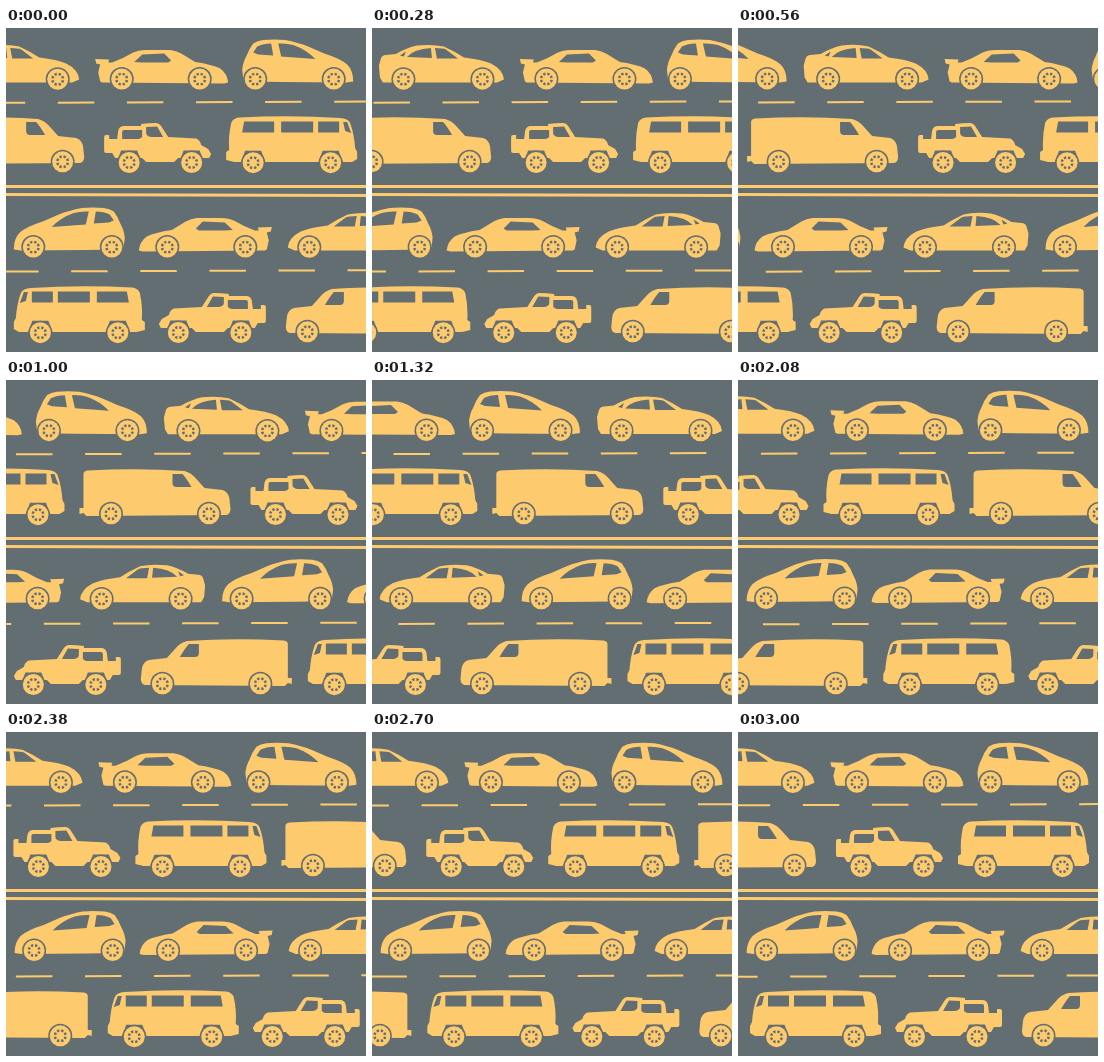
Write an HTML page with a canvas that moves like this. It is 360 px wide and 324 px high and loops after 3.02 s.

```html
<!DOCTYPE html>
<html lang="en">
<head>
<meta charset="utf-8">
<title>Traffic</title>
<style>
  html, body { margin: 0; width: 100%; height: 100%; overflow: hidden; background: #636e72; }
  canvas { display: block; }
</style>
</head>
<body>
<canvas id="stage" width="360" height="324"></canvas>
<script>
const ctx = document.getElementById('stage').getContext('2d');
const ROAD = '#636e72', PAINT = '#fdcb6e', LOOP = 3020;
const BOXY_ARCH = new Path2D('M-14 4L-8-12H8L14 4Z');

// Every vehicle faces right, with its rear bumper at x = 0.
const vehicle = (width, wheels, wheelY, body, windows, boxy) =>
  ({ width, wheels, wheelY, boxy, body: new Path2D(body), windows: new Path2D(windows) });

const hatch = vehicle(111, [13, 91.5], 39.5,
  'M1 39L0 30Q1 22 4 17Q7 9 11 4Q15 1 21 .5Q32-.5 43 .5Q56 3 66 7L82 14Q98 19 105 25Q111 31 111 42L104 43L40 42.5L4 42Z',
  'M36 4Q44 3.5 51 5.5Q64 10 73 19.5L39 17ZM11 13L15 7Q21 4 29 4L31 16L16 15Z');

const sedan = vehicle(125, [24.5, 103.5], 39.7,
  'M1 38L0 26L2 19Q3 15.5 7 15.5L17 14.5Q28 8 38 6Q54 4.5 65 7Q76 12 85 18Q103 20 112 24Q124 30 125 40L118 43H4Z',
  'M28 17.5Q35 9.5 52 8.5L53 18.5ZM56 8.5Q64 8.5 67 10L79 19H58ZM21 16L27 12L25 17Z');

const sports = vehicle(132, [25.5, 103.5], 39.5,
  'M4 42L2 33L4 25L0 24L-1 19.5L13 20L12 23H16Q27 19 36 13.5Q42 10.5 50 10.5H74Q80 11 85 14L99 22.5Q116 25 124 29Q131 34 132 43L128 44L6 43Z',
  'M38 22.5L46 15L68 14L75 21L72 23H46Z');

const van = vehicle(151, [31.5, 129.5], 44.8,
  'M4 44L0 45V39H4L4 5Q4 2 8 1.5Q60-1 105 2Q112 4 116 9L125 19L143 21Q149 23 150 30L151 40Q151 45 147 46L7 47Z',
  'M93 5H103Q106 8 112 18H97Q93 18 93 14Z');

const jeep = vehicle(107, [25, 87.5], 45.5,
  'M0 20Q0 18 2 18H5V22H13L14 14Q15 9 20 9H37V7Q45 6 52 6Q55 6 57 9L64 20L92 21.5Q96 23 97 28L104 32L107 37L105 41L98 41H74L70 45H42L38 41L11 41L8 36H2Q0 36 0 34Z',
  'M18 15Q18 13 20 13H38V20Q36 22 34 22H18ZM42 10L53 9.5L59 20H47Q42 19 42 16Z', true);

const bus = vehicle(132, [27, 104.5], 45.7,
  'M0 43V35L3 33Q2 20 5 6Q7 1 13 .5Q65-2 114 1Q122 1.5 124 6Q128 17 129 31L131 35V42L126 45H8Z',
  'M18 4.5H48V15.5H16ZM55 4.5H87V15.5H55ZM92 4.5H113V15.5H92ZM117 5L121 5L125 16L119 14Z', true);

// cars: [vehicle, left edge at the start]; speed in px/ms until "end"
const lanes = [
  { y: 11.6, rise: 0.8, period: 416, speed: 0.2097, end: 2000,
    cars: [[sedan, -52], [sports, 90], [hatch, 236]] },
  { y: 89, rise: 0, period: 439, speed: 439 / 3000, end: 3000,
    cars: [[van, -73], [jeep, 98], [bus, 220]] },
  { y: 179.6, rise: 0.6, period: 416, speed: -0.2077, end: 2000, left: true,
    cars: [[hatch, 8], [sports, 133], [sedan, 282]] },
  { y: 259, rise: 0, period: 439, speed: -0.145, end: 3000, left: true,
    cars: [[bus, 7], [jeep, 153], [van, 280]] }
];

const mod = (a, n) => ((a % n) + n) % n;

function disc(r, color) {
  ctx.fillStyle = color;
  ctx.beginPath();
  ctx.arc(0, 0, r, 0, 2 * Math.PI);
  ctx.fill();
}

function drawWheel(x, y, boxy) {
  ctx.save();
  ctx.translate(x, y);
  disc(12, ROAD);
  if (boxy) ctx.fill(BOXY_ARCH);
  disc(10.5, PAINT);
  ctx.strokeStyle = ROAD;
  ctx.lineWidth = 2.5;
  for (let i = 0; i < 8; i++) {
    const a = (i + 0.5) * Math.PI / 4;
    ctx.beginPath();
    ctx.arc(0, 0, 5.3, a - 0.22, a + 0.22);
    ctx.stroke();
  }
  ctx.restore();
}

function drawVehicle(v, x, y, left) {
  ctx.save();
  ctx.translate(left ? x + v.width : x, y);
  if (left) ctx.scale(-1, 1);
  ctx.fillStyle = PAINT;
  ctx.fill(v.body);
  ctx.fillStyle = ROAD;
  ctx.fill(v.windows);
  for (const w of v.wheels) drawWheel(w, v.wheelY, v.boxy);
  ctx.restore();
}

function drawLane(lane, t) {
  const time = Math.min(t, lane.end), y = lane.y - lane.rise * time / lane.end;
  for (const [v, start] of lane.cars) {
    const x = mod(start + lane.speed * time + 160, lane.period) - 160;
    drawVehicle(v, x, y, lane.left);
    if (x + lane.period < 361) drawVehicle(v, x + lane.period, y, lane.left);
  }
}

function line(x1, y1, x2, y2, width) {
  ctx.strokeStyle = PAINT;
  ctx.lineWidth = width;
  ctx.beginPath();
  ctx.moveTo(x1, y1);
  ctx.lineTo(x2, y2);
  ctx.stroke();
}

function drawDashes(offset, y) {
  const gap = 69.1, slope = -1.2 / 360;
  for (let x = mod(offset, gap) - gap; x < 360; x += gap)
    line(x, y + slope * x, x + 36.5, y + slope * (x + 36.5), 2);
}

function draw(now) {
  const t = Math.min(mod(now, LOOP), 3000);
  ctx.fillStyle = ROAD;
  ctx.fillRect(0, 0, 360, 324);
  drawDashes(52 - 0.18 * t, 74.8 - 0.0005 * t);
  drawDashes(65 + 0.18 * t, 243.5 + 0.0004 * t);
  line(0, 158.5, 360, 158.5, 3);
  line(0, 166.5, 360, 167.5, 3);
  for (const lane of lanes) drawLane(lane, t);
}

const start = performance.now();
function tick() {
  draw(performance.now() - start);
  requestAnimationFrame(tick);
}
tick();
</script>
</body>
</html>
```
